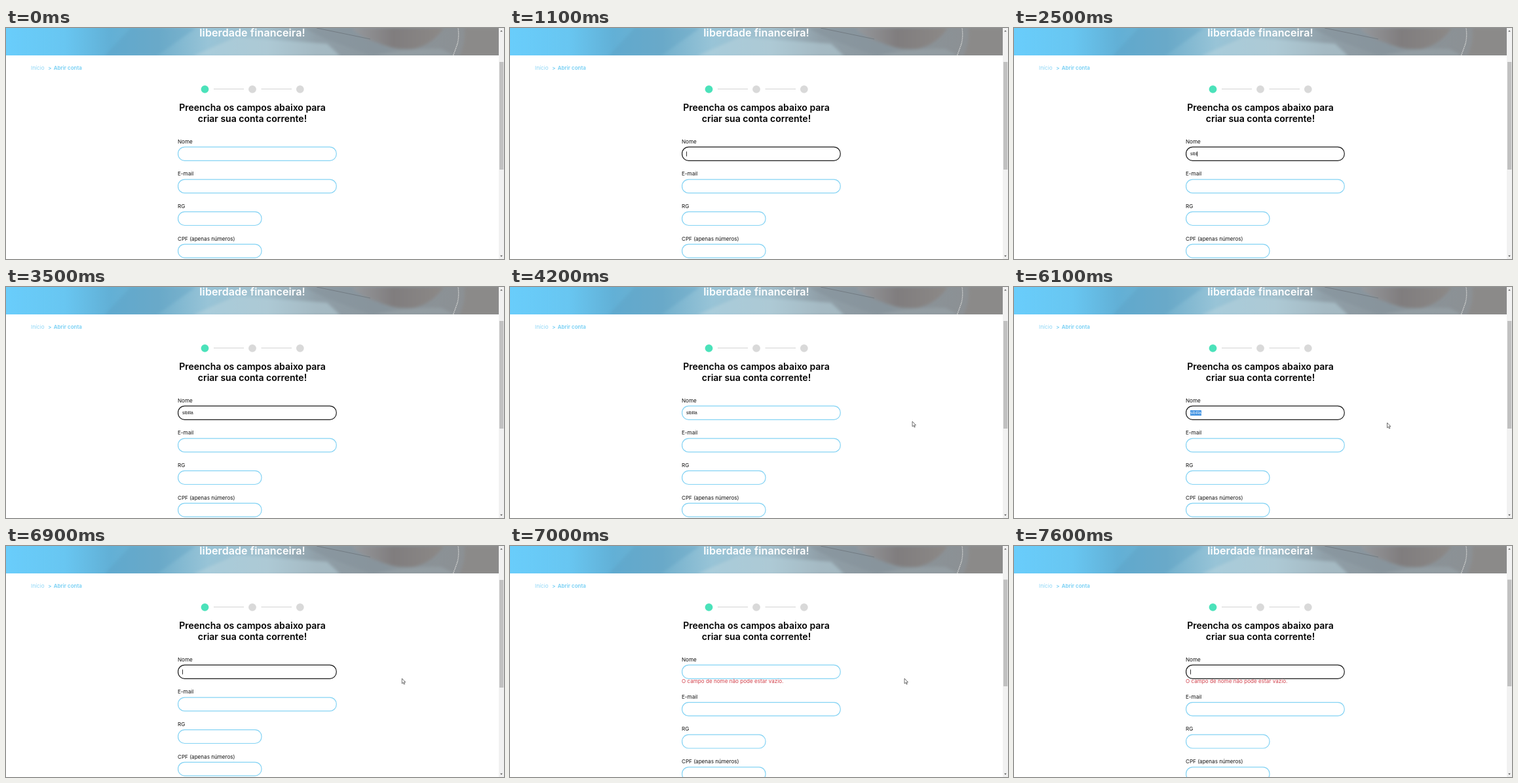
These frames come from a looping animation (760x354 px, 8 s). An HTML page:

```html
<!DOCTYPE html>
<html lang="pt-BR">
<head>
<meta charset="utf-8">
<title>Abrir conta</title>
<style>
html, body { margin: 0; width: 100%; height: 100%; overflow: hidden; background: #fff; }
svg { display: block; width: 760px; height: 354px; font-family: Inter, "Open Sans", sans-serif; }
.title { font-size: 14px; font-weight: 600; text-anchor: middle; }
.hero { font-size: 16px; font-weight: 600; letter-spacing: .1px; text-anchor: middle; fill: #fff; }
.label { font-size: 8.1px; font-weight: 400; fill: #111; }
.crumb { font-size: 8.2px; fill: #8dd6f6; }
.here { font-size: 8px; font-weight: 600; fill: #76cff4; }
.error { font-size: 8px; letter-spacing: .06px; fill: #cf3d48; }
.value { font: 6.67px "Liberation Sans", Arial, sans-serif; }
.box { fill: #fff; stroke: #84d3f4; stroke-width: 1.2; }
</style>
</head>
<body>
<svg viewBox="0 0 760 354">
  <defs>
    <linearGradient id="sky">
      <stop offset="0" stop-color="#69cdfb"/>
      <stop offset=".12" stop-color="#68c6f1"/>
      <stop offset=".21" stop-color="#62b0d6"/>
      <stop offset=".31" stop-color="#72b0cd"/>
      <stop offset=".41" stop-color="#98c4d7"/>
      <stop offset=".53" stop-color="#a2bfcc"/>
      <stop offset=".63" stop-color="#909fa8"/>
      <stop offset=".8" stop-color="#8a949a"/>
      <stop offset="1" stop-color="#8d8e90"/>
    </linearGradient>
    <linearGradient id="skin">
      <stop offset="0" stop-color="#96999d"/>
      <stop offset=".45" stop-color="#807d7e"/>
      <stop offset="1" stop-color="#8c8987"/>
    </linearGradient>
    <clipPath id="band"><rect width="752" height="42"/></clipPath>
    <clipPath id="page"><rect width="752" height="354"/></clipPath>
    <filter id="soft" x="-20%" y="-50%" width="140%" height="200%"><feGaussianBlur stdDeviation="2"/></filter>
  </defs>

  <rect width="760" height="354" fill="#fff"/>
  <g clip-path="url(#band)">
    <rect width="752" height="43" fill="url(#sky)"/>
    <g filter="url(#soft)">
      <path d="M190 0H290L230 43H150Z" fill="#5a9dbf" opacity=".35"/>
      <path d="M285 43L350 14L490 24L510 43Z" fill="#b9d3de" opacity=".5"/>
      <path d="M455 0H535L600 43H560L490 18Z" fill="#86939b" opacity=".6"/>
      <path d="M528 0H668Q650 26 622 32Q590 34 566 22Q540 14 528 0Z" fill="url(#skin)"/>
      <path d="M560 43Q610 30 665 32L685 43Z" fill="#98a2a7" opacity=".7"/>
      <path d="M700 0H752V43H692Q702 24 700 0Z" fill="#8b8a89"/>
    </g>
    <path d="M474 0L556 17" stroke="#727b82"/>
    <path d="M690 0Q692 16 688 27T682 43" fill="none" stroke="#d3d4d3" stroke-width="1.6" stroke-linecap="round" stroke-dasharray=".1 2.5"/>
  </g>
  <text class="hero" x="376" y="13">liberdade financeira!</text>

  <text class="crumb" x="38" y="64">Início</text>
  <text class="here" x="64.3" y="64">&gt;</text>
  <text class="here" x="72.7" y="64">Abrir conta</text>

  <path d="M317 93.5H363M389.5 93.5H436" stroke="#d2d2d2"/>
  <circle cx="303.5" cy="93.8" r="5.9" fill="#4be2ba"/>
  <circle cx="376" cy="93.8" r="5.9" fill="#d9d9d9"/>
  <circle cx="448.8" cy="93.8" r="5.9" fill="#d9d9d9"/>
  <text class="title" x="376" y="127.2">Preencha os campos abaixo para</text>
  <text class="title" x="376" y="143.5">criar sua conta corrente!</text>

  <text class="label" x="262" y="176.7">Nome</text>
  <rect id="name" class="box" x="262.6" y="182.3" width="241.6" height="21" rx="10"/>
  <rect id="mark" x="269" y="189" width="17" height="8" fill="#348be0"/>
  <text id="value" class="value" x="269" y="195.3"></text>
  <rect id="caret" y="189.3" width=".8" height="7.4"/>
  <text id="error" class="error" x="262" y="210">O campo de nome não pode estar vazio.</text>
  <g clip-path="url(#page)"><g id="rest"></g></g>

  <rect x="752" width="8" height="354" fill="#f1f1f1"/>
  <rect id="thumb" x="753" width="6.3" fill="#c1c1c1"/>
  <path d="M754.2 5.6L756 3.4L757.8 5.6ZM754.2 348.6L756 350.8L757.8 348.6Z" fill="#555"/>
  <path id="mouse" d="M0 0V7.8L1.8 6.2L3 9L4.3 8.4L3.1 5.7H5.4Z" fill="#fff" stroke="#333" stroke-width=".7"/>
</svg>
<script>
const LOOP = 8000, WORD = "sibilla";
const KEYS = [1900, 2100, 2300, 2500, 2600, 2800, 3000];
const SELECT = 4900, CLEAR = 6600, FAIL = 7000;
const FOCUS = [[1000, 4200], [4700, FAIL], [7600, LOOP]];
const CARET = [[1000, 1700], [1900, 3500], [4000, 4200], [4700, SELECT], [CLEAR, FAIL], [7600, LOOP]];
// pointer strokes: time, x, y; the last point of each hides it again
const MOVES = [
  [[100, 436, 313], [300, 424, 262], [400, 411, 212], [500, 408, 200]],
  [[3800, 510, 200], [4200, 614, 206], [4300, 606, 206], [4600, 480, 204], [4700, 440, 196]],
  [[5700, 350, 204], [5800, 400, 205], [6100, 569.5, 208], [6500, 611, 206],
   [6900, 604.3, 203], [7000, 602, 203], [7300, 490, 198]]
];

const $ = id => document.getElementById(id);
const within = (spans, t) => spans.some(([a, b]) => t >= a && t < b);
const show = (el, on) => el.setAttribute("visibility", on ? "visible" : "hidden");
const set = (el, attrs) => { for (const k in attrs) el.setAttribute(k, attrs[k]); };

$("rest").innerHTML = [["E-mail", 241.6], ["RG", 127.4], ["CPF (apenas números)", 127.4]].map(([text, w], i) => {
  const y = 226.3 + i * 49.6;
  return `<text class="label" x="262" y="${y}">${text}</text>
    <rect class="box" x="262.6" y="${y + 5.8}" width="${w}" height="20.8" rx="10"/>`;
}).join("");

const ends = [0];
for (let i = 1; i <= WORD.length; i++) {
  $("value").textContent = WORD.slice(0, i);
  ends.push($("value").getComputedTextLength());
}
$("mark").setAttribute("width", ends[WORD.length] + .3);

function pointer(t) {
  const path = MOVES.find(m => t >= m[0][0] && t < m[m.length - 1][0]);
  if (!path) return null;
  const i = path.findIndex(p => p[0] > t), [t0, x0, y0] = path[i - 1], [t1, x1, y1] = path[i];
  const k = (t - t0) / (t1 - t0);
  return [x0 + (x1 - x0) * k, y0 + (y1 - y0) * k];
}

function draw(ms) {
  const t = Math.floor(ms % LOOP / 100) * 100;
  const typed = t < CLEAR ? KEYS.filter(k => t >= k).length : 0;
  const picked = t >= SELECT && t < CLEAR, failed = t >= FAIL;

  $("value").textContent = WORD.slice(0, typed);
  $("value").setAttribute("fill", picked ? "#fff" : "#111");
  show($("mark"), picked);
  show($("caret"), within(CARET, t));
  $("caret").setAttribute("x", 269 + ends[typed]);
  $("name").style.stroke = within(FOCUS, t) ? "#1c1c1c" : "";

  show($("error"), failed);
  $("rest").setAttribute("transform", `translate(0 ${failed ? 7.5 : 0})`);
  set($("thumb"), failed ? { y: 51.5, height: 163.5 } : { y: 52, height: 165 });

  const at = pointer(t);
  show($("mouse"), at);
  if (at) $("mouse").setAttribute("transform", `translate(${at})`);
}

const start = performance.now();
function tick() {
  draw(performance.now() - start);
  requestAnimationFrame(tick);
}
tick();
</script>
</body>
</html>
```
